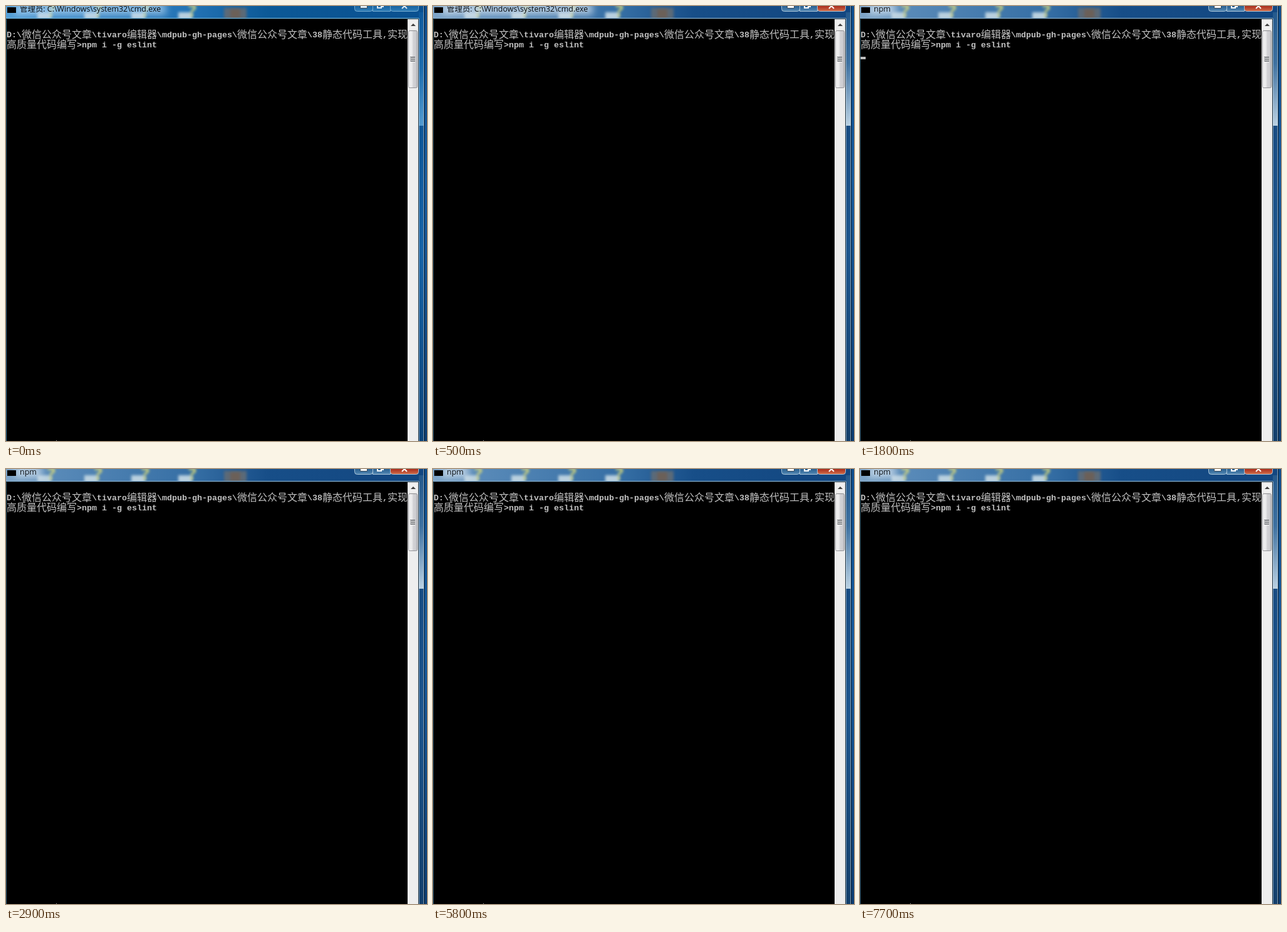
Write an HTML page with a canvas that moves like this. It is 672 by 694 pixels and loops after 8 s.

```html
<!DOCTYPE html>
<html lang="zh">
<head>
<meta charset="utf-8">
<style>
  html, body { margin: 0; width: 100%; height: 100%; overflow: hidden; background: #000; }
  canvas { display: block; }
</style>
</head>
<body>
<canvas id="stage" width="672" height="694"></canvas>
<script>
const ctx = document.getElementById('stage').getContext('2d');
const LOOP = 8000;
const PROMPT = [
  'D:\\微信公众号文章\\tivaro编辑器\\mdpub-gh-pages\\微信公众号文章\\38静态代码工具,实现',
  '高质量代码编写>npm i -g eslint'
];
const TITLE = '管理员: C:\\Windows\\system32\\cmd.exe';
const BLINKS = [1400, 1900, 2400, 2900, 3400, 3800, 4300, 4800, 5300, 5800, 6300, 6800, 7200, 7700];

function rect(x, y, w, h, fill) {
  ctx.fillStyle = fill;
  ctx.fillRect(x, y, w, h);
}

// Stops are [offset, colour] pairs along the line.
function gradient(x0, y0, x1, y1, ...stops) {
  const g = ctx.createLinearGradient(x0, y0, x1, y1);
  stops.forEach(([at, color]) => g.addColorStop(at, color));
  return g;
}

function box(x, y, w, h, r, fill, stroke) {
  ctx.beginPath();
  ctx.roundRect(x + .5, y + .5, w - 1, h - 1, r);
  ctx.fillStyle = fill;
  ctx.fill();
  ctx.strokeStyle = stroke;
  ctx.lineWidth = 1;
  ctx.stroke();
}

function blurred(radius, draw) {
  ctx.save();
  ctx.beginPath();
  ctx.rect(0, 0, 556, 20);
  ctx.clip();
  ctx.filter = `blur(${radius}px)`;
  draw();
  ctx.restore();
}

function drawTitleBar(title, active) {
  rect(0, 0, 672, 21, active
    ? gradient(0, 0, 672, 0, [0, '#7fa6c9'], [.1, '#5a8bb9'], [.45, '#356ea4'], [.62, '#174e88'], [1, '#124680'])
    : gradient(0, 0, 672, 0, [0, '#55a0d6'], [.1, '#3d8ac8'], [.45, '#2272b4'], [.62, '#0c5997'], [1, '#0a5090']));

  // Desktop icons showing through the glass
  blurred(2, () => {
    ctx.font = 'bold 27px "Open Sans", sans-serif';
    for (let x = 50; x < 300; x += 75) {
      rect(x, 10, 22, 12, '#b9d0df');
      ctx.fillStyle = '#d6d779';
      ctx.fillText('?', x + 16, 17);
    }
    rect(348, 3, 36, 18, '#5c6a78');
    rect(358, 5, 16, 14, '#6b6058');
  });

  ctx.font = '12.45px "Open Sans", "Noto Sans CJK SC", sans-serif';
  const width = ctx.measureText(title).width;
  blurred(6, () => rect(14, -4, width + 16, 18, active ? 'rgba(216,229,240,.72)' : 'rgba(190,222,246,.65)'));
  ctx.fillStyle = '#080c10';
  ctx.fillText(title, 22, 9);
  rect(2, 2, 14, 9, '#000');

  drawButtons(active);
  rect(0, 19, 660, 1, active ? '#8cb0cc' : '#73b8de');
  rect(0, 20, 659, 1, '#182d3c');
}

function drawButtons(active) {
  const blue = active
    ? gradient(0, 0, 0, 9, [0, '#285f91'], [1, '#578bb5'])
    : gradient(0, 0, 0, 9, [0, '#17639f'], [1, '#3280b9']);
  const red = gradient(0, 0, 0, 9, [0, '#a92c1b'], [1, '#d4744f']);
  const edge = active ? '#a9c4d8' : '#72a9cf';
  box(556, -6, 30, 15, 4, blue, edge);
  box(585, -6, 29, 15, 0, blue, edge);
  box(613, -6, 46, 15, 4, active ? red : blue, edge);

  const mark = active ? '#fff' : '#dceaf5';
  box(565, -3, 12, 7, 0, mark, '#34495b');
  ctx.strokeStyle = mark;
  ctx.lineWidth = 2;
  ctx.strokeRect(593, -1, 6, 4);
  ctx.beginPath();
  ctx.moveTo(599, 1);
  ctx.lineTo(602, 1);
  ctx.lineTo(602, -2);
  ctx.moveTo(632, 4);
  ctx.lineTo(636, 0);
  ctx.lineTo(640, 4);
  ctx.stroke();
}

function drawFrame(active) {
  rect(0, 21, 1, 673, active
    ? gradient(0, 21, 0, 694, [0, '#2b5365'], [.5, '#24465a'], [1, '#315d79'])
    : gradient(0, 21, 0, 694, [0, '#28667e'], [.5, '#2a4a63'], [1, '#3577a0']));
  rect(659, 10, 8, 181, active
    ? gradient(0, 10, 0, 190, [0, '#24598c'], [.45, '#3d70a0'], [1, '#b9d0e2'])
    : gradient(0, 10, 0, 190, [0, '#0e5a9d'], [.5, '#1c6cad'], [1, '#5199cf']));
  rect(659, 191, 8, 503, active
    ? gradient(0, 191, 0, 694, [0, '#174b82'], [.4, '#1c558d'], [1, '#123e6b'])
    : gradient(0, 191, 0, 694, [0, '#0d5596'], [.4, '#1763a6'], [1, '#0b4379']));

  // Bevel: dark line beside the client area, light lines on both edges of the glass
  const light = 'rgba(225,242,255,.55)';
  rect(658, 20, 1, 674, '#182d3c');
  rect(659, 20, 1, 674, light);
  rect(666, 0, 1, 694, light);
  rect(667, 0, 1, 694, '#0b1c2c');
  rect(668, 0, 4, 694, gradient(0, 0, 0, 694, [0, '#0d4c8b'], [.4, '#175a9b'], [1, '#0c3c70']));
}

function drawScrollbar() {
  rect(641, 21, 17, 673, '#eeeeee');
  box(642, 22, 16, 17, 2, '#f0f0f0', '#e0e0e0');
  ctx.fillStyle = '#404040';
  ctx.beginPath();
  ctx.moveTo(646, 32);
  ctx.lineTo(650, 28);
  ctx.lineTo(654, 32);
  ctx.fill();
  box(642, 39, 15, 92, 2, gradient(642, 0, 657, 0, [0, '#f5f5f5'], [.48, '#e6e6e8'], [.5, '#d5d5d8'], [1, '#c4c4c8']), '#929296');
  for (let y = 81; y < 89; y += 3) {
    rect(645, y, 8, 1, '#5c5f63');
    rect(646, y + 1, 7, 1, '#a2a4a8');
    rect(645, y + 2, 8, 1, '#f2f2f2');
  }
}

// Half-width characters take 8 px, full-width ones 16 px.
function drawLine(line, y) {
  let x = 1;
  ctx.fillStyle = '#c0c0c0';
  for (const part of line.match(/[\u4e00-\u9fff]+|[^\u4e00-\u9fff]+/g)) {
    const wide = part.charCodeAt(0) > 255;
    ctx.font = wide
      ? '300 16px "Noto Sans CJK SC", sans-serif'
      : 'bold 13.33px "Liberation Mono", monospace';
    ctx.fillText(part, x, y + (wide ? 1 : 0));
    x += part.length * (wide ? 16 : 8);
  }
}

function drawConsole(t) {
  rect(1, 21, 640, 673, '#000');
  PROMPT.forEach((line, i) => drawLine(line, 50 + i * 16));
  if (t >= 900 && t < 1200) rect(241, 65, 8, 4, '#c0c0c0');
  if (BLINKS.filter(at => at <= t).length % 2) rect(1, 81, 8, 4, '#c0c0c0');
  rect(80, 693, 1, 1, '#c0c0c0');
}

function render(now) {
  const t = now % LOOP;
  const active = t >= 500;
  const title = t < 1200 ? TITLE : t < 1800 ? TITLE + ' - npm  i -g eslint' : 'npm';
  drawTitleBar(title, active);
  drawFrame(active);
  drawScrollbar();
  drawConsole(t);
}

const start = performance.now();
function tick() {
  render(performance.now() - start);
  requestAnimationFrame(tick);
}
tick();
</script>
</body>
</html>
```
